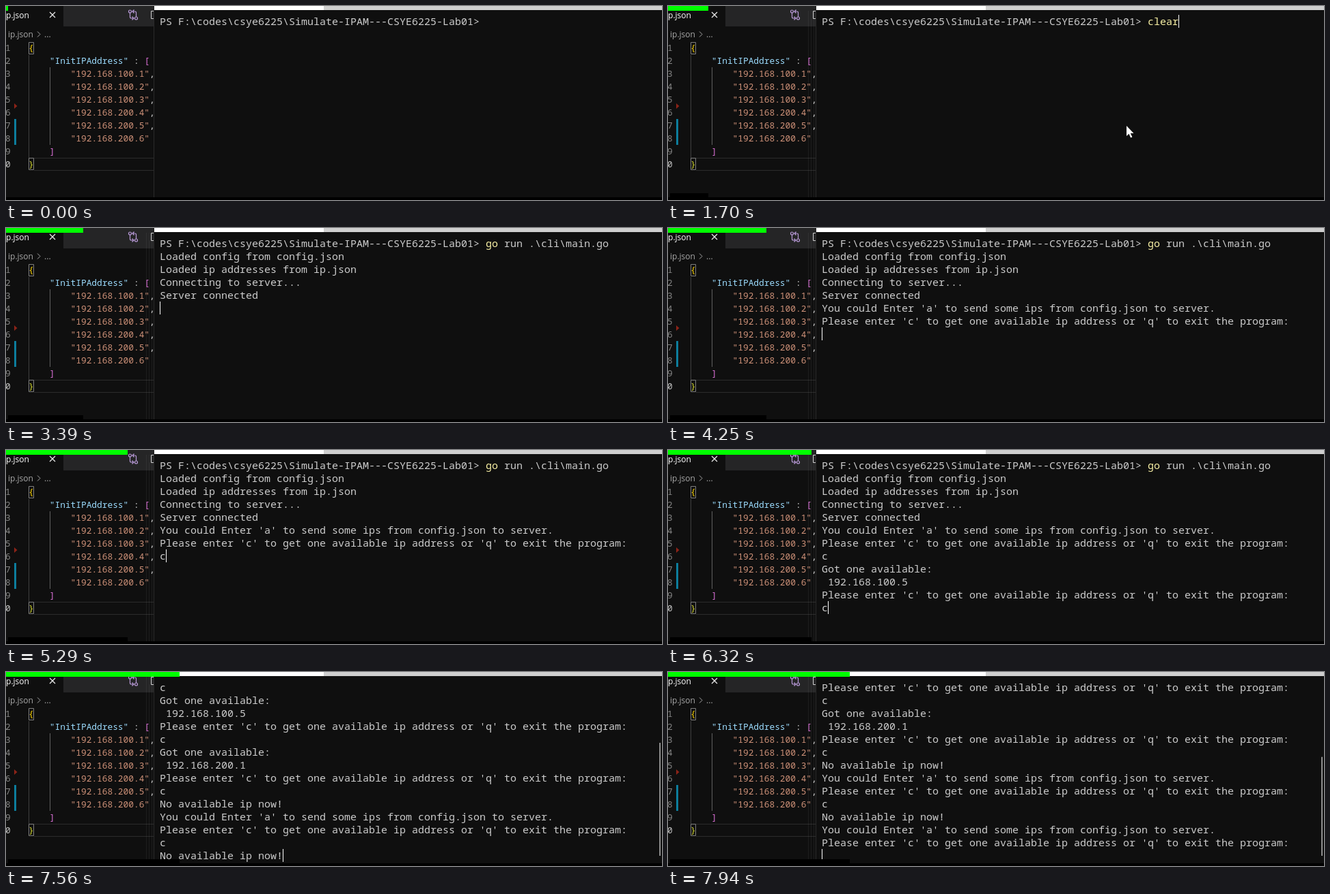
An HTML page with a canvas that plays this animation: 960 px wide and 285 px high, repeating every 8 s.

```html
<!DOCTYPE html>
<html lang="en">
<head>
<meta charset="utf-8">
<title>Editor and terminal session</title>
<style>
  html, body { margin: 0; width: 100%; height: 100%; overflow: hidden; background: #0f0f0f; }
  canvas { display: block; }
</style>
</head>
<body>
<canvas width="960" height="285"></canvas>
<script>
const ctx = document.querySelector('canvas').getContext('2d');
const LOOP = 8000, TICK = 94.45, BAR_STEP = 3.13;
const ROWS = 14, ROW_H = 19, CELL = 9, TERM_X = 225, EDIT_X = 33, EDIT_CELL = 7.7;
const TERM_FONT = '500 15px "Noto Sans Mono", monospace';
const EDIT_FONT = '12.83px "Noto Sans Mono", monospace';
const UI_FONT = '12px "Open Sans", sans-serif';

const PROMPT = 'PS F:\\codes\\csye6225\\Simulate-IPAM---CSYE6225-Lab01> ';
const HINT = "You could Enter 'a' to send some ips from config.json to server.\n";
const ASK = "Please enter 'c' to get one available ip address or 'q' to exit the program:\n";
const NONE = 'No available ip now!';

// Terminal output by time; a form feed clears the screen.
const session = [
  [0, PROMPT],
  ...[...'clear'].map((key, i) => [1040 + 140 * i, key]),
  [1880, '\f' + PROMPT],
  [2160, 'go run .\\cli\\main.go'],
  [2640, '\n'],
  [2920, 'Loaded config from config.json\nLoaded ip addresses from ip.json\nConnecting to server...\n'],
  [3110, 'Server connected\n'],
  [3680, HINT + ASK],
  [4720, 'c'],
  [5470, '\nGot one available:\n 192.168.100.5\n' + ASK],
  [6220, 'c'],
  [6410, '\nGot one available:\n 192.168.200.1\n' + ASK],
  [6690, 'c'],
  [6790, '\n' + NONE],
  [6980, '\n' + HINT + ASK],
  [7260, 'c'],
  [7450, '\n' + NONE],
  [7640, '\n' + HINT],
  [7740, ASK],
];

function rect(x, y, w, h, color) {
  ctx.fillStyle = color;
  ctx.fillRect(x, y, w, h);
}

function text(str, x, y, color, font) {
  ctx.font = font;
  ctx.fillStyle = color;
  ctx.fillText(str, x, y);
}

function stroke(path, color, width = 1) {
  ctx.strokeStyle = color;
  ctx.lineWidth = width;
  ctx.stroke(new Path2D(path));
}

function code(str, col, line, color) {
  text(str, EDIT_X + col * EDIT_CELL, 66 + line * ROW_H, color, EDIT_FONT);
}

function drawEditor() {
  rect(84, 0, 133, 30, '#252526');
  text('ip.json', -3, 18, '#ffffff', UI_FONT);
  text('ip.json', 3, 46, '#a9a9a9', UI_FONT);
  text('...', 56, 46, '#a9a9a9', UI_FONT);
  stroke('M46 37.5l4 4l-4 4', '#a9a9a9');
  stroke('M64 9l8 8m0-8l-8 8', '#e8e8e8', 1.3);
  stroke('M181.5 10v6q0 2 2 2h3m-2-2.5l2.5 2.5l-2.5 2.5M190.5 16v-6q0-2-2-2h-3m2-2.5l-2.5 2.5l2.5 2.5', '#b99ad8', 1.2);
  stroke('M179.5 8a2 2 0 1 0 4 0a2 2 0 1 0-4 0M188.5 18a2 2 0 1 0 4 0a2 2 0 1 0-4 0', '#b99ad8', 1.2);
  stroke('M217 7.5h-4.5v11h4.5', '#d0d0d0');

  rect(41, 223, 176, 1, '#2b2b2b');
  rect(41, 241, 176, 1, '#2b2b2b');
  rect(33, 72, 1, 151, '#404040');
  rect(64, 90, 1, 114, '#606060');
  for (const y of [53.5, 223.5]) stroke(`M33.5 ${y}h7v17h-7z`, '#808080');

  for (let i = 0; i < 10; i++) {
    text((i + 1) % 10, -1, 66 + i * ROW_H, i === 9 ? '#c6c6c6' : '#858585', EDIT_FONT);
  }
  code('{', 0, 0, '#ffd700');
  code('"InitIPAddress"', 4, 1, '#9cdcfe');
  code(':', 20, 1, '#d4d4d4');
  code('[', 22, 1, '#da70d6');
  for (let i = 1; i <= 6; i++) {
    code(`"192.168.${i < 4 ? 100 : 200}.${i}"`, 8, i + 1, '#ce9178');
    if (i < 6) code(',', 23, i + 1, '#d4d4d4');
  }
  code(']', 4, 8, '#da70d6');
  code('}', 0, 9, '#d8dc30');

  rect(12, 166, 3, 38, '#0c7d9d');
  ctx.fillStyle = '#8b2318';
  ctx.fill(new Path2D('M12 143l4.5 4l-4.5 4z'));
}

function drawTerminal(time) {
  rect(217, 0, 743, 285, '#0f0f0f');
  rect(216, 6, 1, 275, '#2b2b2b');
  rect(217, 0, 248, 6, '#ffffff');
  rect(465, 0, 495, 6, '#cfcfcf');
  rect(0, 281, 960, 4, '#000000');

  const output = session.filter(([at]) => at <= time).map(([, str]) => str).join('');
  const lines = output.split('\f').pop().split('\n');
  const scroll = Math.max(0, lines.length - ROWS);

  lines.slice(scroll).forEach((line, row) => {
    const y = 28 + row * ROW_H;
    if (!line.startsWith(PROMPT)) return text(line, TERM_X, y, '#cccccc', TERM_FONT);
    const [command, ...args] = line.slice(PROMPT.length).split(' ');
    const x = TERM_X + PROMPT.length * CELL;
    text(PROMPT, TERM_X, y, '#cccccc', TERM_FONT);
    text(command, x, y, '#f9f1a5', TERM_FONT);
    text(args.join(' '), x + (command.length + 1) * CELL, y, '#cccccc', TERM_FONT);
  });

  if (time > 450) {
    const column = lines[lines.length - 1].length;
    rect(TERM_X + column * CELL, 13 + (lines.length - 1 - scroll) * ROW_H, 1, 19, '#ffffff');
  }
  if (scroll) {
    const top = 21 + 249 * scroll / lines.length;
    rect(956, top, 2, 270 - top, '#8f8f8f');
  }
}

function drawPointer(time) {
  if (time < 370 || time >= 1880) return;
  const [x, y] = time < 560 ? [645, 249] : [671, 176];
  ctx.save();
  ctx.translate(x, y);
  const arrow = new Path2D('M0 0v15l3.5-3.2l2.6 5.7l2.3-1l-2.6-5.5h4.7z');
  ctx.fillStyle = '#ffffff';
  ctx.fill(arrow);
  ctx.restore();
}

function draw(now) {
  const step = Math.floor(now % LOOP / TICK);
  const time = step * TICK;
  const progress = Math.round((step + 1) * BAR_STEP);

  rect(0, 0, 960, 285, '#0f0f0f');
  drawEditor();
  if (time > 450) {
    for (const x of [205, 209, 213]) rect(x, 7, 1, 274, 'rgba(255,255,255,.06)');
  }
  drawTerminal(time);
  drawPointer(time);
  rect(3, 275, progress - 3, 10, '#000000');
  rect(0, 0, progress, 7, '#00ff00');
}

const start = performance.now();
function frame() {
  draw(performance.now() - start);
  requestAnimationFrame(frame);
}
frame();
</script>
</body>
</html>
```
